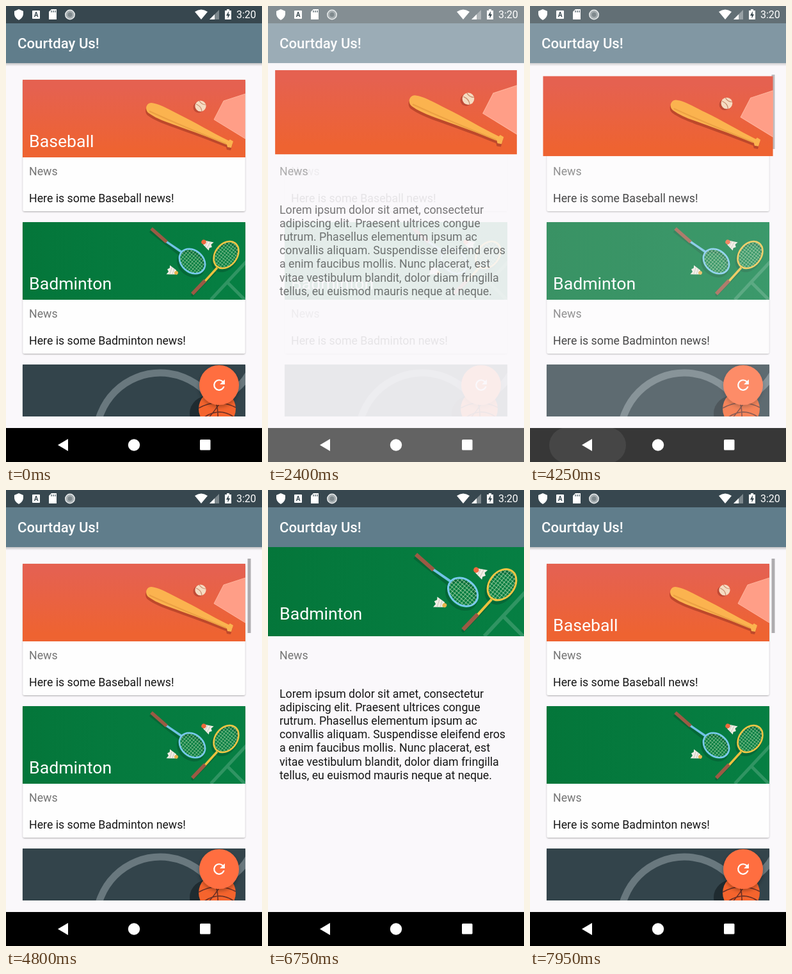
Recreate the animation shown at these times as an HTML page. Size 400x711 px, loop 8000 ms.

```html
<!DOCTYPE html>
<html lang="en">
<head>
<meta charset="utf-8">
<title>Sports cards</title>
<style>
html, body { margin: 0; width: 100%; height: 100%; overflow: hidden; background: #fff; }
svg { display: block; width: 100vw; height: 100vh; }
text { font-family: Roboto, "Open Sans", sans-serif; font-size: 17.75px; fill: #161616; }
.bar { font-size: 22.2px; font-weight: 500; fill: #fff; }
.head { font-size: 26.7px; fill: #fff; }
.sub { fill: #747474; }
</style>
</head>
<body>
<svg id="stage" viewBox="0 0 400 711">
  <defs>
    <clipPath id="frame"><rect width="348" height="121"/></clipPath>
    <clipPath id="port"><rect x="18" y="107" width="365" height="533"/></clipPath>
    <clipPath id="navClip"><rect y="658" width="400" height="53"/></clipPath>
    <linearGradient id="clay" x2="0" y2="1"><stop offset=".1" stop-color="#e56150"/><stop offset=".9" stop-color="#ee6331"/></linearGradient>
    <linearGradient id="court" x2="1" y2="0"><stop stop-color="#04763a"/><stop offset="1" stop-color="#067f43"/></linearGradient>
    <linearGradient id="drop" x2="0" y2="1"><stop stop-color="#000" stop-opacity=".22"/><stop offset="1" stop-color="#000" stop-opacity="0"/></linearGradient>
    <pattern id="net" width="4" height="4" patternUnits="userSpaceOnUse"><path d="M0 0H4M0 0V4" stroke="#b9dcae" stroke-width="1.1"/></pattern>
    <filter id="lift" x="-10%" y="-10%" width="120%" height="125%"><feDropShadow dx="0" dy="1" stdDeviation="1.1" flood-opacity=".32"/></filter>
    <filter id="float" x="-30%" y="-30%" width="160%" height="170%"><feDropShadow dx="0" dy="3" stdDeviation="3" flood-opacity=".32"/></filter>

    <g id="art0" clip-path="url(#frame)">
      <rect width="348" height="121" fill="url(#clay)"/>
      <path d="M299 62L314 33L348 22V92Z" fill="#ff9e87" stroke="#ffb39c"/>
      <path id="bat" transform="translate(-1 4)" fill="#bd482b" d="M201 36C213 37 228 46 246 55C271 67 295 82 322 95L324 93L329 96L326 106L320 105L319 101C292 90 264 80 239 71C222 65 208 60 197 52C190 47 193 36 201 36Z"/>
      <use href="#bat" style="display:none"/>
      <path fill="#fbb34f" d="M201 36C213 37 228 46 246 55C271 67 295 82 322 95L324 93L329 96L326 106L320 105L319 101C292 90 264 80 239 71C222 65 208 60 197 52C190 47 193 36 201 36Z"/>
      <path d="M198 49C224 61 276 83 318 100" fill="none" stroke="#eba043" stroke-width="2"/>
      <circle cx="275" cy="43" r="8.5" fill="#c04a35"/>
      <circle cx="278" cy="41" r="8.6" fill="#f5dcc2"/>
      <path d="M271 38Q279 41 280 49M276 33Q280 39 286 39" fill="none" stroke="#c98a6c" stroke-width="1.2"/>
    </g>

    <g id="art1" clip-path="url(#frame)">
      <rect width="348" height="121" fill="url(#court)"/>
      <path d="M350 61L294 121M319 93L347 121" stroke="#fff" stroke-opacity=".17" stroke-width="5"/>
      <g fill="none" stroke="#064f2a" stroke-opacity=".45" stroke-width="4" transform="translate(-2 4)">
        <path d="M201 10L248 47M303 73L266 111"/>
        <ellipse rx="22" ry="17" transform="translate(265 61) rotate(40)"/>
        <ellipse rx="23" ry="17" transform="translate(318 51) rotate(-52)"/>
      </g>
      <g fill="none">
        <path d="M224 30L249 47" stroke="#72c2e6" stroke-width="3.4"/>
        <path d="M201 10L225 31" stroke="#9b5a44" stroke-width="5.5"/>
        <ellipse rx="22" ry="17" transform="translate(265 61) rotate(40)" fill="url(#net)" stroke="#79caee" stroke-width="2.6"/>
        <path d="M304 71L284 93" stroke="#edc13f" stroke-width="3.4"/>
        <path d="M285 91L265 112" stroke="#9b5a44" stroke-width="5.5"/>
        <ellipse rx="23" ry="17" transform="translate(318 51) rotate(-52)" fill="url(#net)" stroke="#f0c544" stroke-width="2.6"/>
      </g>
      <g id="bird" transform="translate(283 31) rotate(28)">
        <path d="M1 -3L14 -7L12 -2L15 1L12 4L13 8L1 4Z" fill="#f1eee5"/>
        <path d="M5 -4V5M9 -5V6" stroke="#c3c2b6" stroke-width=".8"/>
        <circle r="3.7" fill="#ec693c"/>
      </g>
      <g transform="translate(240 79) rotate(198)">
        <path d="M1 -3L14 -7L12 -2L15 1L12 4L13 8L1 4Z" fill="#f1eee5"/>
        <path d="M5 -4V5M9 -5V6" stroke="#c3c2b6" stroke-width=".8"/>
        <circle r="3" fill="#e5b44c"/>
      </g>
    </g>

    <g id="art2" clip-path="url(#frame)">
      <rect width="348" height="121" fill="#33444b"/>
      <g fill="none" stroke="#69787e" stroke-width="11">
        <circle cx="215" cy="113" r="100"/>
        <path d="M354 13Q335 48 290 59"/>
      </g>
      <ellipse cx="292" cy="76" rx="31" ry="28" fill="#1f2b30"/>
      <circle cx="304" cy="69" r="29" fill="#f5642d"/>
      <path d="M275 68Q304 52 333 67M280 85Q306 65 330 82M294 42Q310 66 303 98M318 43Q304 70 284 90" fill="none" stroke="#6b3025" stroke-width="1.6"/>
    </g>
  </defs>

  <rect width="400" height="711" fill="#fff"/>
  <rect y="27" width="400" height="631" fill="#faf8fb"/>
  <g id="list"></g>
  <g id="detail"></g>
  <use id="hero"/>
  <text id="cap" class="head" x="18" y="202"></text>

  <g id="chrome" fill="#fff">
    <path d="M20 5L27 8V13Q26 19 20 22Q14 19 13 13V8Z"/>
    <rect x="41" y="7" width="12" height="13" rx="1"/>
    <text x="47" y="17.3" text-anchor="middle" style="font-size:10px;font-weight:700;fill:#37474f">A</text>
    <path d="M71 5H79V21H67V9Z"/>
    <path d="M71 7V10M74 7V10M77 7V10" stroke="#52636b" stroke-width="1.3"/>
    <circle cx="100" cy="13.5" r="7.2" fill="#a5adb0" stroke="#e8ebec" stroke-width="1.5"/>
    <circle cx="100" cy="13.5" r="3.5" fill="#7f898d"/>
    <path d="M295 9Q305 2 315 9L305 21Z"/>
    <path d="M333 6V21H318Z" fill-opacity=".35"/>
    <path d="M326 13V21H318Z"/>
    <path d="M345 5H349V7H352V21H342V7H345Z"/>
    <path d="M348 8L344 15H346.5V19.5L350 13H347.7Z" fill="#37474f"/>
    <text x="360" y="19.3" style="font-size:16px;fill:#fff">3:20</text>
    <rect id="ripple" y="657" height="56" rx="28" clip-path="url(#navClip)"/>
    <path d="M81 684.5L97 675V694Z"/>
    <circle cx="200" cy="684.5" r="9.2"/>
    <rect x="303" y="676" width="16.5" height="16.5" rx="1.5"/>
  </g>
</svg>
<script>
const $ = id => document.getElementById(id);
const LOOP = 8000, PITCH = 222;
const sports = ["Baseball", "Badminton", "Basketball", "Bowling", "Cycling", "Golf"];
const plain = { 3: ["#4b3a63", "#d9593f"], 4: ["#2a8fb0", "#f0c544"], 5: ["#6fa544", "#f4f1e8"] };
const lorem = [
  "Lorem ipsum dolor sit amet, consectetur", "adipiscing elit. Praesent ultrices congue",
  "rutrum. Phasellus elementum ipsum ac", "convallis aliquam. Suspendisse eleifend eros",
  "a enim faucibus mollis. Nunc placerat, est", "vitae vestibulum blandit, dolor diam fringilla",
  "tellus, eu euismod mauris neque at neque."];
const trips = [
  { card: 0, press: 2000, open: 2195, openFor: 540, tap: 3640, back: 4050, settle: 4800, tail: 4610, capAt: Infinity },
  { card: 1, press: 5150, open: 5645, openFor: 440, tap: 6890, back: 7354, settle: Infinity, tail: 7950, capAt: 6750 }];
const BACK_FOR = 400;

const text = (x, y, s, cls = "", id = "") => `<text x="${x}" y="${y}" class="${cls}" id="${id}">${s}</text>`;
const bars = () => `<rect width="400" height="27" fill="#37474f"/>
  <rect y="27" width="400" height="62" fill="#607d8b"/>
  <rect y="658" width="400" height="53"/>` + text(18, 66.3, "Courtday Us!", "bar");

function banner(i) {
  if (!plain[i]) return `<use href="#art${i}"/>`;
  const [back, ball] = plain[i];
  return `<rect width="348" height="121" fill="${back}"/><circle cx="285" cy="60" r="30" fill="${ball}"/>`;
}

const card = (name, i) => `<g transform="translate(26 ${115 + PITCH * i})">
  <rect x=".5" width="347" height="205" rx="2.5" fill="#fefefe" filter="url(#lift)"/>
  <g id="pic${i}">${banner(i)}</g>
  ${text(10, 104.5, name, "head", "name" + i)}
  ${text(10, 148.7, "News", "sub")}
  ${text(10, 190.5, `Here is some ${name} news!`)}</g>`;

$("list").innerHTML = `<rect y="89" width="400" height="5" fill="url(#drop)"/>${bars()}
  <g clip-path="url(#port)"><g id="cards">${sports.map(card).join("")}</g>
  <rect id="thumb" x="377.5" width="5" height="116" fill="#aeacaf"/></g>
  <circle cx="333" cy="591" r="31" fill="#ff6e40" filter="url(#float)"/>
  <path transform="translate(319.7 577.7) scale(1.11)" fill="#fff" d="M17.65 6.35A7.96 7.96 0 0 0 12 4a8 8 0 1 0 7.73 10h-2.08A6 6 0 1 1 12 6c1.66 0 3.14.69 4.22 1.78L13 11h7V4z"/>`;
$("detail").innerHTML = bars() + text(18, 202, "", "head", "title") + text(18, 264, "News", "sub") +
  lorem.map((s, i) => text(18, 324 + 21.1 * i, s)).join("");

const clamp = v => Math.min(1, Math.max(0, v));

// cubic-bezier(.4, 0, .2, 1), solved by bisection
function ease(u) {
  u = clamp(u);
  let lo = 0, hi = 1;
  for (let i = 0; i < 22; i++) {
    const s = (lo + hi) / 2, r = 1 - s;
    if (1.2 * r * r * s + .6 * r * s * s + s * s * s < u) lo = s; else hi = s;
  }
  return lo * lo * (3 - 2 * lo);
}

const smooth = u => (1 - Math.cos(Math.PI * clamp(u))) / 2;
const show = (id, on) => $(id).style.visibility = on ? "visible" : "hidden";
const fade = (id, a) => { $(id).setAttribute("opacity", a); show(id, a > 0); };

function draw(t) {
  const trip = trips[t < 5000 ? 0 : 1], n = trip.card;
  const returning = t >= trip.back;
  const q = ease((t - trip.back) / BACK_FOR);
  const p = returning ? 1 - q : ease((t - trip.open) / trip.openFor);

  fade("list", returning ? q : clamp(1 - 1.6 * p));
  fade("detail", returning ? clamp(1 - 3 * q) : p);

  const scroll = 700 * (smooth((t - 30) / 830) - smooth((t - 860) / 660));
  $("cards").setAttribute("transform", `translate(0 ${-scroll})`);
  $("thumb").setAttribute("y", 107 + scroll * 533 / 2442);
  $("thumb").setAttribute("opacity", t < 40 ? 0 : t < 4050 ? clamp((1700 - t) / 200) : 1);

  const flying = p > 0;
  for (const { card: c, press, settle } of trips) {
    $("pic" + c).style.display = flying && c === n ? "none" : "";
    $("name" + c).style.display = t >= press && t < settle ? "none" : "";
  }
  const y0 = 115 + PITCH * n;
  show("hero", flying);
  $("hero").setAttribute("href", "#art" + n);
  $("hero").setAttribute("transform",
    `translate(${26 * (1 - p)} ${y0 + (89 - y0) * p}) scale(${1 + p * 52 / 348})`);
  $("title").textContent = $("cap").textContent = sports[n];
  show("cap", t >= trip.capAt && !returning);

  const since = t - trip.tap, w = 60 + 60 * smooth(since / 300);
  $("ripple").setAttribute("x", 90 - w / 2);
  $("ripple").setAttribute("width", w);
  const gone = clamp((trip.tail - t) / (trip.tail - trip.tap - 350));
  fade("ripple", since < 0 ? 0 : .13 * clamp(since / 120) * gone);
}

const start = performance.now();
function tick() {
  draw((performance.now() - start) % LOOP);
  requestAnimationFrame(tick);
}
tick();
</script>
</body>
</html>
```
